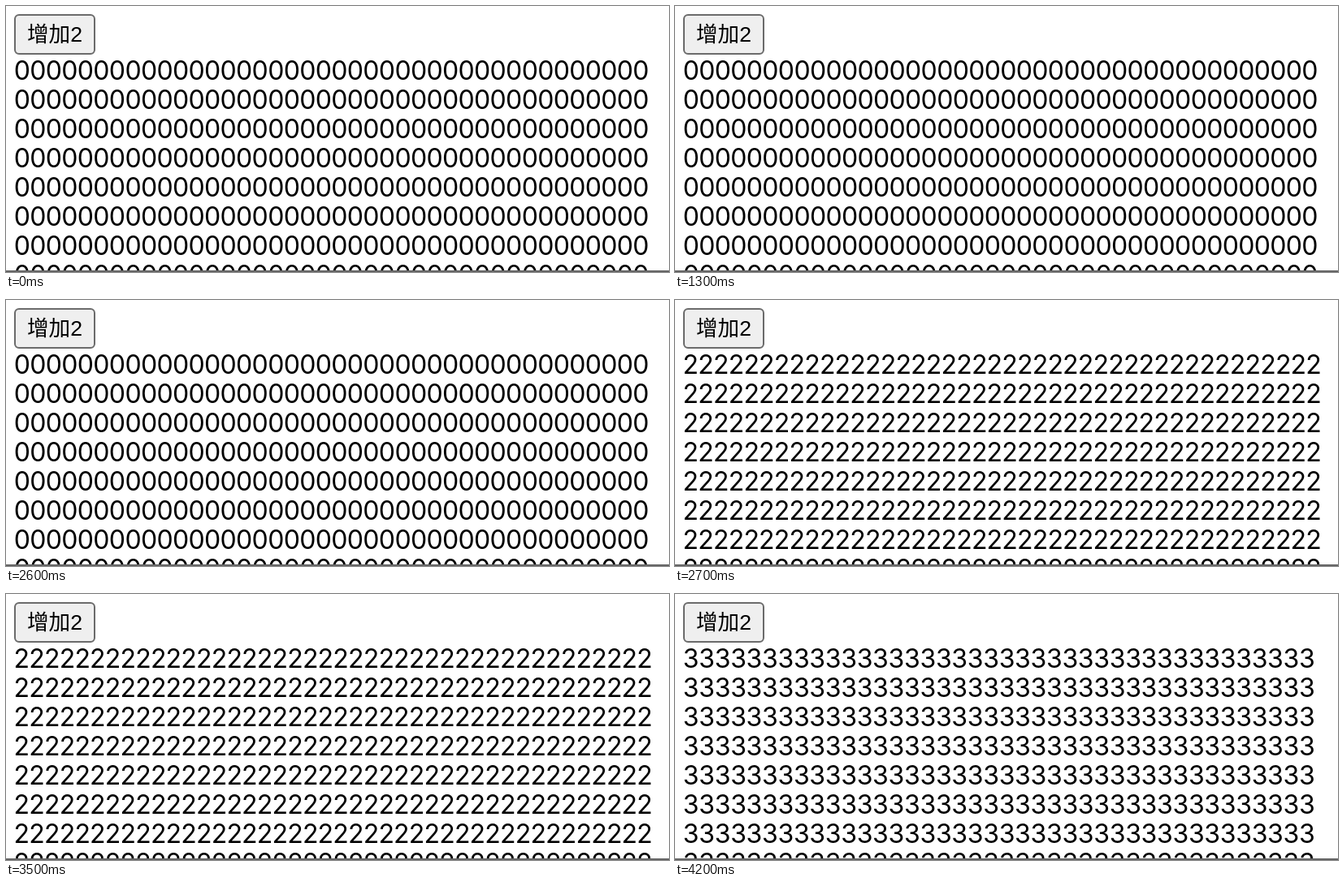
An HTML page with a canvas that plays this animation: 816x328 px, repeating every 4.3 s.

```html
<!DOCTYPE html>
<html lang="zh">
<head>
<meta charset="utf-8">
<style>
html, body { margin: 0; width: 100%; height: 100%; overflow: hidden; background: #fff; }
canvas { display: block; }
</style>
</head>
<body>
<canvas id="stage" width="816" height="328"></canvas>
<script>
const ctx = document.getElementById('stage').getContext('2d');
const LOOP = 4300;
const LEFT = 10, FIRST_BASELINE = 90.5, LINE_HEIGHT = 36, ROWS = 8;

// Each phase fills the page with one digit until its end time.
const phases = [
  { until: 2700, digit: '0', count: 40, advance: 19.53 },
  { until: 4200, digit: '2', count: 42, advance: 18.7 },
  { until: LOOP, digit: '3', count: 40, advance: 19.44 }
];

function drawButton() {
  ctx.beginPath();
  ctx.roundRect(11, 11, 98, 48, 5);
  ctx.fillStyle = '#efefef';
  ctx.fill();
  ctx.lineWidth = 2;
  ctx.strokeStyle = '#6b6b6b';
  ctx.stroke();
  ctx.fillStyle = '#000';
  ctx.textAlign = 'center';
  ctx.font = '26.67px "Liberation Sans", "Noto Sans CJK SC", "Noto Sans CJK", sans-serif';
  ctx.fillText('增加2', 60, 44);
}

function drawDigits({ digit, count, advance }) {
  ctx.fillStyle = '#000';
  ctx.textAlign = 'center';
  ctx.font = '32px Inter, sans-serif';
  for (let row = 0; row < ROWS; row++) {
    const y = FIRST_BASELINE + row * LINE_HEIGHT;
    for (let i = 0; i < count; i++) {
      ctx.fillText(digit, LEFT + (i + 0.5) * advance, y);
    }
  }
}

function drawBottomEdge() {
  ctx.fillStyle = '#fff';
  ctx.fillRect(0, 326, 816, 2);
  ctx.fillStyle = '#666';
  ctx.fillRect(0, 326, 816, 2);
}

function render(now) {
  const time = now % LOOP;
  ctx.fillStyle = '#fff';
  ctx.fillRect(0, 0, 816, 328);
  drawButton();
  drawDigits(phases.find(phase => time < phase.until));
  drawBottomEdge();
}

const start = performance.now();
function tick() {
  render(performance.now() - start);
  requestAnimationFrame(tick);
}
tick();
</script>
</body>
</html>
```
